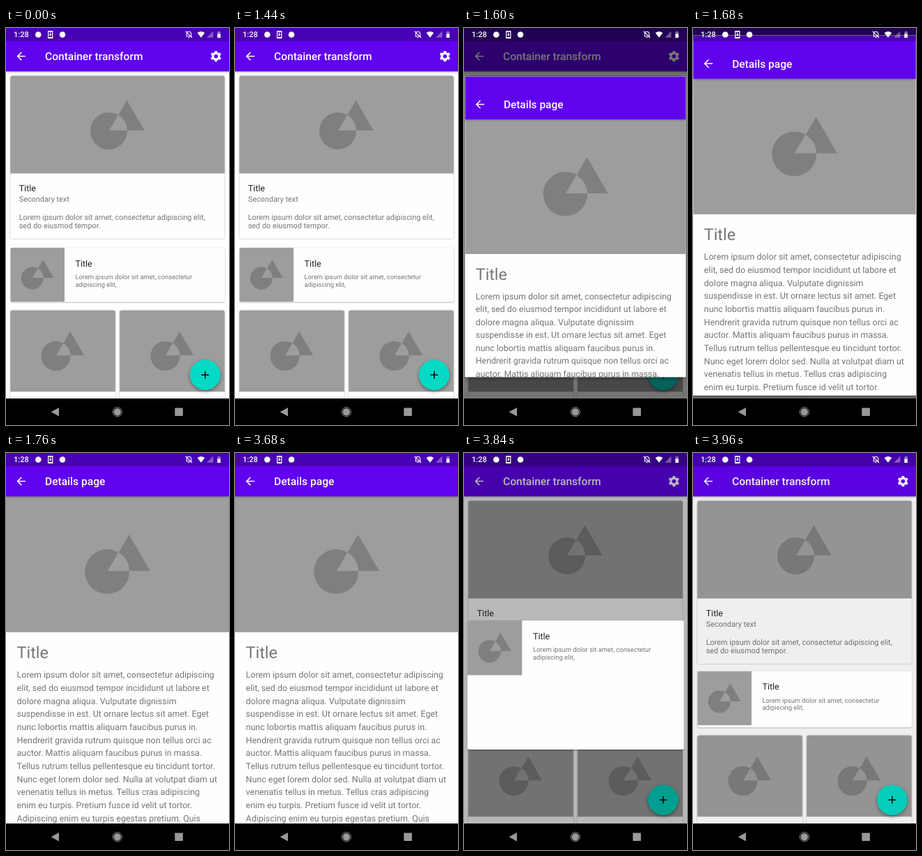
An HTML page that plays this animation: 320 px wide and 569 px high, repeating every 4 s.

```html
<!DOCTYPE html>
<html lang="en">
<head>
<meta charset="utf-8">
<title>Container transform</title>
<style>
  html, body { margin: 0; width: 100%; height: 100%; overflow: hidden; background: #000; }
  #stage { position: relative; width: 320px; height: 569px; overflow: hidden; background: #fefefe; }
  #stage > *, #box > svg { position: absolute; left: 0; top: 0; }
  svg { display: block; overflow: hidden; }
  text { font-family: Roboto, sans-serif; text-rendering: geometricPrecision; }
  #scrim { width: 320px; height: 531px; background: #000; }
  #box { overflow: hidden; background: #fefefe; }
  #box > svg { transform-origin: 0 0; }
  .card { fill: #fefefe; filter: drop-shadow(0 .8px .8px rgba(0, 0, 0, .3)); }
  .bar { fill: #6002ee; filter: drop-shadow(0 1.5px 1.5px rgba(0, 0, 0, .3)); }
  .fab { fill: #03dac6; filter: drop-shadow(0 2.5px 2.5px rgba(0, 0, 0, .4)); }
</style>
</head>
<body>
<div id="stage">
  <svg id="page" width="320" height="531"></svg>
  <div id="scrim"></div>
  <div id="box">
    <svg id="closed" width="308" height="78"></svg>
    <svg id="open" width="320" height="531"></svg>
  </div>
  <svg id="system" width="320" height="569"></svg>
</div>
<script>
const $ = id => document.getElementById(id);
const GREY = '#9d9d9d', SHAPE = '#7f7f7f', STRONG = '#212121', SOFT = '#757575';

const text = (x, y, size, fill, str, weight = 400) =>
  `<text x="${x}" y="${y}" font-size="${size}" fill="${fill}" font-weight="${weight}">${str}</text>`;

const rect = (x, y, w, h, fill) =>
  `<rect x="${x}" y="${y}" width="${w}" height="${h}" fill="${fill}"/>`;

// Circle and triangle whose overlap stays empty; (x, y) is the circle's centre.
const emblem = (x, y, r) =>
  `<path transform="translate(${x} ${y}) scale(${r})" fill="${SHAPE}" fill-rule="evenodd"
    d="M-1 0A1 1 0 0 1 1 0A1 1 0 0 1-1 0ZM.02-.03L.98-1.66L1.93-.03Z"/>`;

const card = (x, y, w, h, imageH) =>
  `<rect class="card" x="${x}" y="${y}" width="${w}" height="${h}" rx="3"/>
   <path fill="${GREY}" d="M${x} ${y + imageH}v${3 - imageH}q0-3 3-3h${w - 6}q3 0 3 3v${imageH - 3}z"/>`;

const appBar = title =>
  `<rect class="bar" width="320" height="62.2"/>
   <path transform="translate(12.4 31.1) scale(.778)" fill="#fff"
     d="M20 11H7.8l5.6-5.6L12 4l-8 8 8 8 1.4-1.4L7.8 13H20z"/>` +
  text(56, 46, 15.56, '#fff', title, 500);

const tooth = angle => `<path d="M0-9.8V-6M0 9.8V6" transform="rotate(${angle})"/>`;
const gear =
  `<g transform="translate(301.3 40.5) scale(.778)" fill="none" stroke="#fff">
     <circle r="5.6" stroke-width="4"/>
     <g stroke-width="5">${[0, 60, 120].map(tooth).join('')}</g>
   </g>`;

$('page').innerHTML =
  card(6.2, 68.5, 307.6, 233.5, 140) + emblem(147.5, 147.5, 26.5) +
  text(18.7, 233.5, 12.45, STRONG, 'Title') +
  text(18.7, 249, 10.89, SOFT, 'Secondary text') +
  text(18.7, 274.7, 10.89, SOFT, 'Lorem ipsum dolor sit amet, consectetur adipiscing elit,') +
  text(18.7, 287.4, 10.89, SOFT, 'sed do eiusmod tempor.') +
  card(6.2, 404.8, 150.7, 160, 116.4) + emblem(71.5, 470, 21.1) +
  card(163.1, 404.8, 150.7, 160, 116.4) + emblem(228.5, 470, 21.1) +
  appBar('Container transform') + gear +
  `<circle class="fab" cx="285.8" cy="497.2" r="21.8"/>
   <path d="M280.4 497.2h10.8M285.8 491.8v10.8" stroke="#000" stroke-width="1.5"/>`;

$('closed').innerHTML =
  rect(0, 0, 77.8, 77.8, GREY) + emblem(31.5, 43.9, 16) +
  text(93.3, 26.9, 12.45, STRONG, 'Title') +
  text(93.3, 45, 9.33, SOFT, 'Lorem ipsum dolor sit amet, consectetur') +
  text(93.3, 55.9, 9.33, SOFT, 'adipiscing elit,');

const story = [
  'Lorem ipsum dolor sit amet, consectetur adipiscing',
  'elit, sed do eiusmod tempor incididunt ut labore et',
  'dolore magna aliqua. Vulputate dignissim',
  'suspendisse in est. Ut ornare lectus sit amet. Eget',
  'nunc lobortis mattis aliquam faucibus purus in.',
  'Hendrerit gravida rutrum quisque non tellus orci ac',
  'auctor. Mattis aliquam faucibus purus in massa.',
  'Tellus rutrum tellus pellentesque eu tincidunt tortor.',
  'Nunc eget lorem dolor sed. Nulla at volutpat diam ut',
  'venenatis tellus in metus. Tellus cras adipiscing',
  'enim eu turpis. Pretium fusce id velit ut tortor.',
  'Adipiscing enim eu turpis egestas pretium. Quis',
];
$('open').innerHTML =
  rect(0, 0, 320, 531, '#fefefe') + rect(0, 0, 320, 256.8, GREY) + emblem(145.2, 170, 32) +
  text(15.6, 294, 23.35, SOFT, 'Title') +
  story.map((line, i) => text(15.6, 322.3 + i * 18.68, 12.45, SOFT, line)).join('') +
  appBar('Details page');

$('system').innerHTML =
  rect(0, 0, 320, 19, 'rgba(0,0,0,.25)') + rect(0, 531, 320, 38, '#000') +
  text(11, 13.4, 11, '#fff', '1:28', 500) +
  `<g fill="#fff">
     <circle cx="46.3" cy="9.5" r="4.3"/>
     <path fill-rule="evenodd" d="M60 4h7.4v11H60zM61.2 5.8v7.2h5v-7.2z"/>
     <path d="M63.1 6.6h1.2v2.6h1.5l-2.1 2.4-2.1-2.4h1.5z"/>
     <circle cx="81" cy="9.5" r="4.3"/>
     <path d="M274.6 7.1q5.3-4.3 10.6 0L279.9 13.8z"/>
     <path d="M297.4 4.6v9.2h-9.2z" opacity=".35"/>
     <path d="M303.4 5.4h1.2v-1h2v1h1.2v8.6h-4.4z" opacity=".45"/>
     <path d="M303.4 8.6h4.4V14h-4.4z"/>
   </g>
   <g fill="none" stroke="#fff" stroke-width="1.1">
     <path d="M258.7 12h7V8.4q0-3-3.2-3.2t-3.2 3.2V12M261.4 13.8h2M257.6 4.6l9.4 9.4"/>
   </g>
   <g fill="#999">
     <path d="M76 544v12.4L64.6 550.2z"/>
     <circle cx="159.8" cy="550.2" r="5.2"/>
     <circle cx="159.8" cy="550.2" r="6.6" fill="none" stroke="#999" stroke-width=".9"/>
     <rect x="242.3" y="544.4" width="11.6" height="11.6" rx=".8"/>
   </g>`;

const LOOP = 4000, STEP = 40, DURATION = 300, OPEN_AT = 1449, CLOSE_AT = 3693;
const clamp = v => Math.min(1, Math.max(0, v));
const mix = (a, b, p) => a + (b - a) * p;

// cubic-bezier(.4, 0, .2, 1)
function ease(x) {
  if (x <= 0 || x >= 1) return clamp(x);
  let lo = 0, hi = 1, s;
  for (let i = 0; i < 30; i++) {
    s = (lo + hi) / 2;
    const at = 1.2 * (1 - s) ** 2 * s + .6 * (1 - s) * s * s + s ** 3;
    if (at < x) lo = s; else hi = s;
  }
  return 3 * (1 - s) * s * s + s ** 3;
}

function pose(t) {
  const closing = t >= CLOSE_AT;
  const u = clamp((t - (closing ? CLOSE_AT : OPEN_AT)) / DURATION);
  return closing
    ? { p: 1 - ease(u), fade: clamp((.4 - u) / .2), dim: 1 - u }
    : { p: ease(u), fade: clamp((u - .2) / .2), dim: clamp(u / .2) };
}

function draw(t) {
  const { p, fade, dim } = pose(t);
  const left = mix(6.2, 0, p), top = mix(314.7, 0, p);
  const width = 320 - 2 * left, height = mix(392.4, 531, p) - top;
  const lift = mix(.8, 3, p);
  $('scrim').style.opacity = .54 * dim;
  Object.assign($('box').style, {
    transform: `translate(${left}px, ${top}px)`,
    width: width + 'px',
    height: height + 'px',
    borderRadius: mix(3, 0, p) + 'px',
    boxShadow: `0 ${lift}px ${lift * 1.7}px rgba(0,0,0,.3), 0 0 ${lift}px rgba(0,0,0,.15)`,
  });
  $('closed').style.transform = `scale(${width / 307.6})`;
  $('open').style.transform = `scale(${width / 320})`;
  $('open').style.opacity = fade;
}

const start = performance.now();
function tick() {
  // A few ms of slack keeps timer jitter from landing one step early.
  const t = (performance.now() - start + 4) % LOOP;
  draw(Math.floor(t / STEP) * STEP);
  requestAnimationFrame(tick);
}
tick();
</script>
</body>
</html>
```
